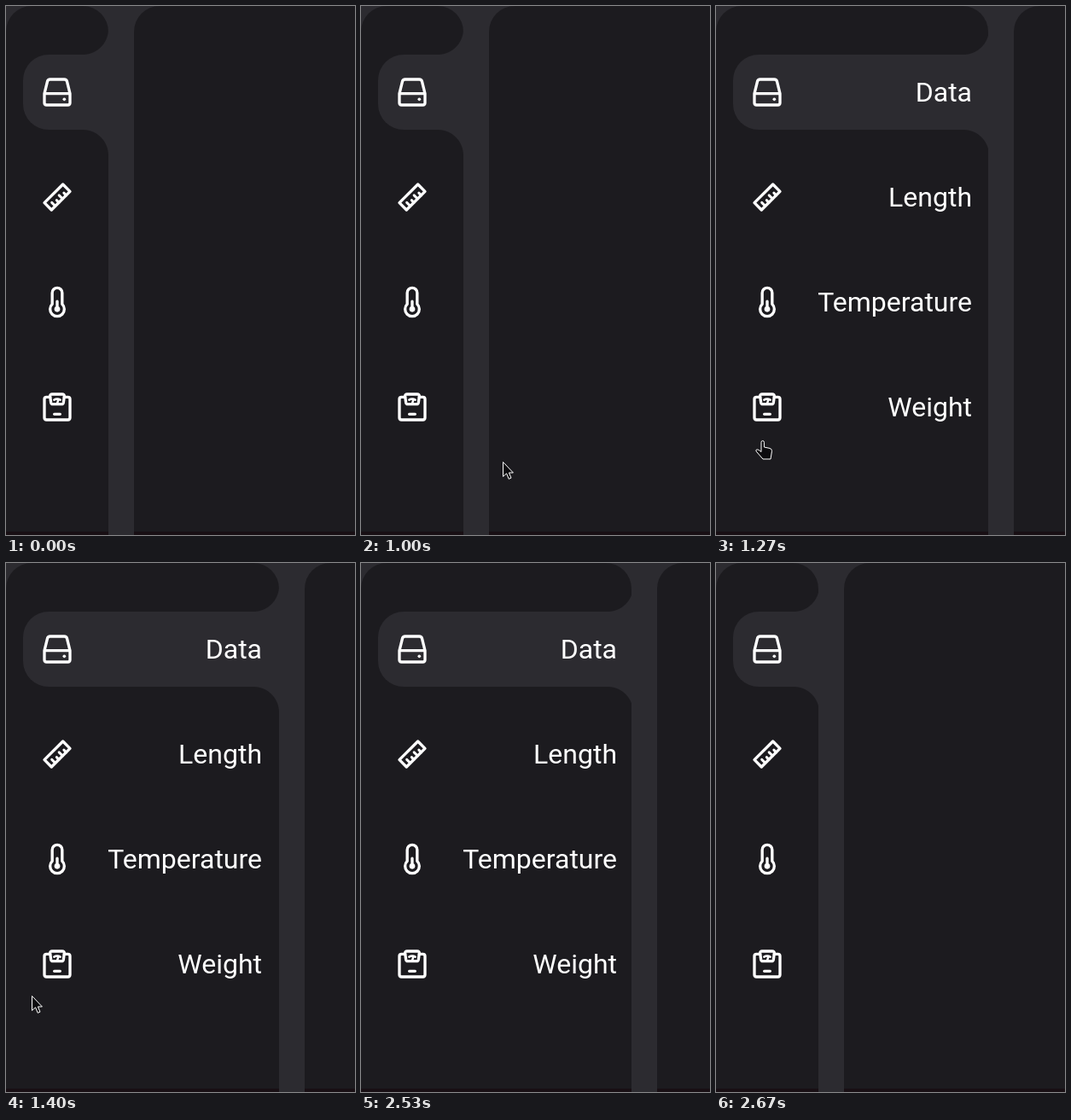
An HTML page for the animation above (3.54 s loop, 409 px wide and 620 px high).

```html
<!DOCTYPE html>
<html lang="en">
<head>
<meta charset="utf-8">
<title>Unit menu</title>
<style>
  :root { --gap: #2c2b30; --panel: #1c1b1f; --edge: #180f14; }
  html, body { margin: 0; width: 100%; height: 100%; overflow: hidden; background: var(--gap); }
  #stage { position: relative; width: 409px; height: 620px; overflow: hidden; background: var(--gap); }
  .panel {
    position: absolute; top: 0; height: 620px; overflow: hidden;
    background: linear-gradient(var(--panel) 616px, var(--edge) 616px);
  }
  #side { left: 0; width: 120px; border-radius: 30px 30px 0 0; }
  #main { left: 150px; width: 409px; border-radius: 30px 0 0 0; }
  #pill {
    position: absolute; left: 20px; top: 57px; width: 100px; height: 88px;
    background: var(--gap); border-radius: 30px 0 0 30px;
  }
  #pill::before, #pill::after { content: ""; position: absolute; right: 0; width: 30px; height: 30px; }
  #pill::before { top: -30px; background: radial-gradient(circle at 0 0, transparent 29.5px, var(--gap) 30.5px); }
  #pill::after { bottom: -30px; background: radial-gradient(circle at 0 100%, transparent 29.5px, var(--gap) 30.5px); }
  .item {
    position: absolute; left: 0; width: 300px; height: 88px;
    font: 32px/88px Roboto, sans-serif; color: #fff; text-align: right; white-space: nowrap;
  }
  .item svg {
    position: absolute; left: 40px; top: 24px; width: 40px; height: 40px; overflow: visible;
    fill: none; stroke: #fff; stroke-width: 2; stroke-linecap: round; stroke-linejoin: round;
  }
  .item .dot { fill: #fff; stroke: none; }
  .cursor {
    position: absolute; left: 0; top: 0; width: 24px; height: 26px; overflow: visible; display: none;
    fill: #0c0b0e; stroke: #fff; stroke-width: 1; stroke-linejoin: round;
  }
</style>
</head>
<body>
<div id="stage">
  <div id="main" class="panel"></div>
  <div id="side" class="panel">
    <div id="pill"></div>
    <div class="item" style="top:57px">
      <svg viewBox="0 0 24 24">
        <path d="M3 13 5.1 4.5Q5.5 3 7 3H17Q18.500 3 18.900 4.500L21 13V19.500Q21 21 19.500 21H4.500Q3 21 3 19.500ZM3.200 13H20.800"/>
        <circle class="dot" cx="17" cy="17" r="1.1"/>
      </svg>Data</div>
    <div class="item" style="top:180px">
      <svg viewBox="0 0 24 24">
        <path d="M16 3 21 8 8 21 3 16Z"/>
        <path d="M18.300 10.700l-1.600-1.600M15.800 13.200l-2.500-2.500M13.200 15.800l-1.600-1.600M10.700 18.300l-2.500-2.500" stroke-width="1.800"/>
      </svg>Length</div>
    <div class="item" style="top:303px">
      <svg viewBox="0 0 24 24">
        <path d="M8.500 13.430V5.500a3.500 3.500 0 0 1 7 0V13.430a5 5 0 1 1-7 0ZM12 11.500V17"/>
        <circle class="dot" cx="12" cy="17" r="2"/>
      </svg>Temperature</div>
    <div class="item" style="top:426px">
      <svg viewBox="0 0 24 24">
        <path d="M7 5H4.500Q3 5 3 6.500V19.500Q3 21 4.500 21H19.500Q21 21 21 19.500V6.500Q21 5 19.500 5H17"/>
        <path d="M8.500 3H15.500Q17.200 3 17 4.500L16.400 8.800Q16.200 10 15 10H9Q7.800 10 7.600 8.800L7 4.500Q6.800 3 8.500 3Z"/>
        <path d="M9.800 7Q12 5.600 14.200 7M12 9.500l.8-2.500" stroke-width="1.500"/>
        <path d="M10 17h4"/>
      </svg>Weight</div>
  </div>
  <svg id="arrow" class="cursor" viewBox="0 0 24 26">
    <path d="M.5.5V17.500L4.600 13.900 7.200 20.300 10 19.100 7.400 13H12.400Z"/>
  </svg>
  <svg id="hand" class="cursor" viewBox="0 0 24 26">
    <path d="M7 13.500V2.300a1.700 1.700 0 0 1 3.400 0V8l6.600 1.400q2.700.7 2.500 3.200l-1.500 9.400H9L1 12.800q-.6-2 1.500-2 1.700.2 4.500 2.700Z"/>
  </svg>
</div>
<script>
  const LOOP = 3540, TICK = 200 / 3, DUR = 147;
  const OPEN = 1126.5, CLOSE = 2520;
  const $ = id => document.getElementById(id);
  const side = $("side"), main = $("main"), pill = $("pill");
  const arrow = $("arrow"), hand = $("hand");

  // Cursor positions per tick: x, y and 1 for the hand
  const enter = [
    [405, 614], [388, 604], [360, 592], [326, 579], [288, 566], [248, 554], [206, 543], [166, 534],
    [131, 526], [100, 519], [71, 513, 1], [46, 509, 1], [33, 507, 1], [30, 507]
  ];
  const leave = [[30, 510], [27, 521], [21, 542], [13, 569], [6, 595], [2, 614]];

  // cubic-bezier(.42, 0, .58, 1)
  function ease(p) {
    if (p <= 0) return 0;
    if (p >= 1) return 1;
    let lo = 0, hi = 1, s = 0.5;
    for (let i = 0; i < 24; i++) {
      s = (lo + hi) / 2;
      const q = 1 - s;
      const x = 1.26 * q * q * s + 1.74 * q * s * s + s * s * s;
      if (x < p) lo = s; else hi = s;
    }
    return s * s * (3 - 2 * s);
  }

  const width = (t, open, close) =>
    Math.round(120 + 200 * (ease((t - open) / DUR) - ease((t - close) / DUR)));

  function tickAt(ms) {
    const r = ms % 200;
    return Math.floor(ms / 200) * 3 + (r >= 130 ? 2 : r >= 70 ? 1 : 0);
  }

  function cursorAt(k) {
    if (k < 8) return null;
    if (k < 32) return enter[Math.min(k - 8, enter.length - 1)];
    return leave[k - 32];
  }

  function place(el, pos) {
    el.style.display = pos ? "block" : "none";
    if (pos) el.style.transform = `translate(${pos[0]}px, ${pos[1]}px)`;
  }

  function draw(ms) {
    const k = tickAt(ms), t = k * TICK;
    const w = width(t, OPEN, CLOSE);
    const flare = Math.max(w, width(t, OPEN - 4, CLOSE + 7));
    side.style.width = w + "px";
    main.style.left = w + 30 + "px";
    pill.style.width = flare - 20 + "px";
    const pos = cursorAt(k);
    place(arrow, pos && !pos[2] ? pos : null);
    place(hand, pos && pos[2] ? pos : null);
  }

  const start = performance.now();
  function loop() {
    draw((performance.now() - start) % LOOP);
    requestAnimationFrame(loop);
  }
  loop();
</script>
</body>
</html>
```
